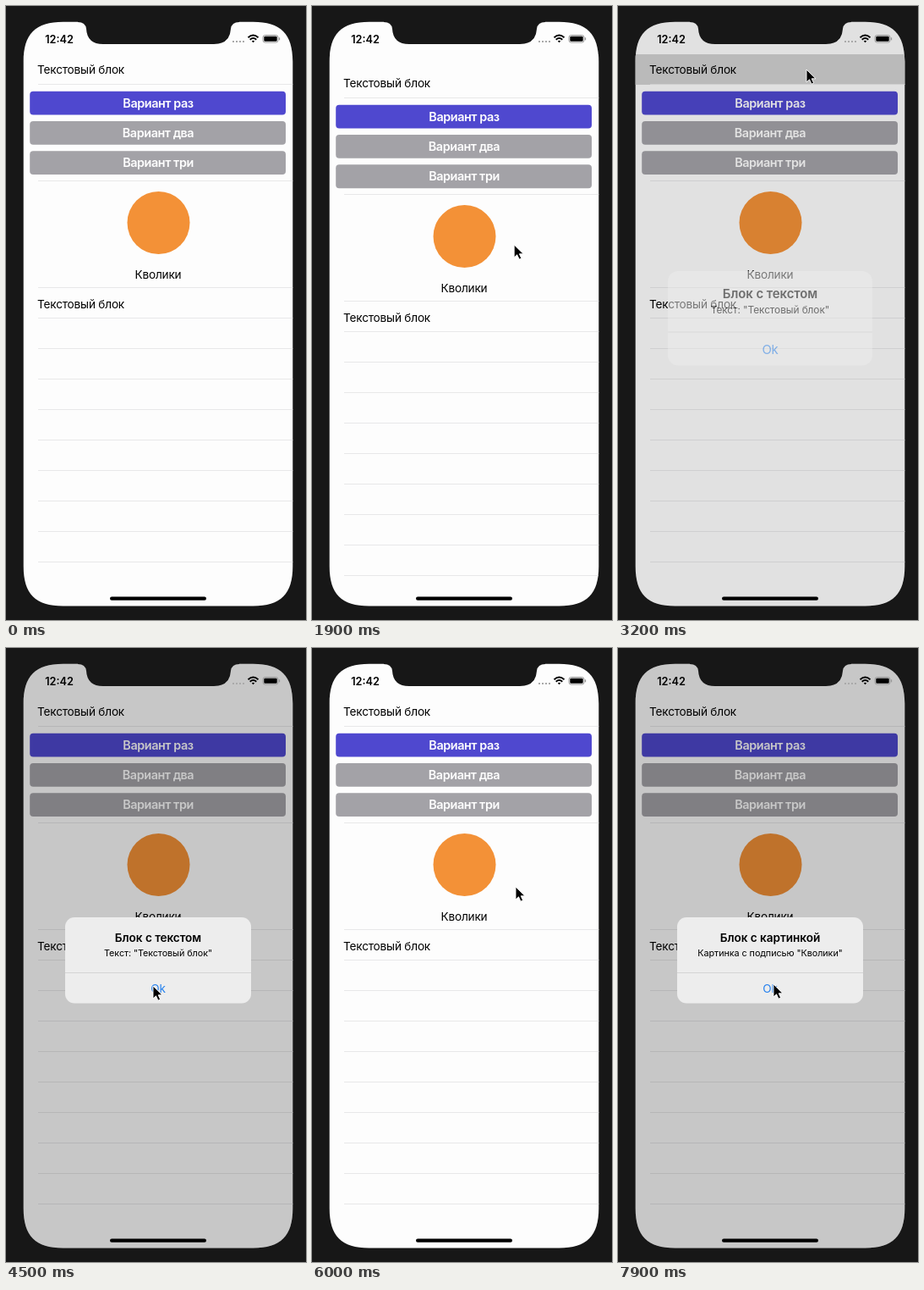
Recreate the animation shown at these times as an HTML page. Size 355 by 725 pixels, loop 8 s.

```html
<!DOCTYPE html>
<html lang="ru">
<head>
<meta charset="utf-8">
<style>
html, body { margin: 0; width: 100%; height: 100%; overflow: hidden; background: #171717; }
svg { display: block; width: 355px; height: 725px; }
text { font: 400 13.6px Inter, Roboto, sans-serif; letter-spacing: -.014em; }
.mid { text-anchor: middle; }
.button { font-size: 14.4px; font-weight: 600; letter-spacing: -.03em; fill: #fff; }
.title { font-weight: 600; letter-spacing: -.004em; }
.message { font-size: 10.8px; letter-spacing: -.006em; }
.clock { font-size: 12.7px; font-weight: 600; letter-spacing: 0; }
</style>
</head>
<body>
<svg viewBox="0 0 355 725">
  <defs><clipPath id="screen"><path id="outline"/></clipPath></defs>
  <g clip-path="url(#screen)">
    <rect width="355" height="725" fill="#fdfdfd"/>
    <g id="list">
      <rect id="textCell" x="20" y="57" width="320" height="36" fill="#d1d1d1"/>
      <rect id="imageCell" x="20" y="207" width="320" height="126" fill="#d1d1d1"/>
      <g id="lines" stroke="#e8e8e9"></g>
      <text x="37" y="80">Текстовый блок</text>
      <g id="buttons"></g>
      <circle cx="180.5" cy="256" r="37" fill="#f39137"/>
      <text class="mid" x="180" y="322">Кволики</text>
      <text x="37" y="356.5">Текстовый блок</text>
    </g>
    <rect id="dim" width="355" height="725"/>
  </g>
  <path d="M85 18H276V19Q267 19 266 27Q265 45 246 45H115Q96 45 95 27Q94 19 85 19Z" fill="#171717"/>
  <text class="clock mid" x="63" y="43.5">12:42</text>
  <path d="M268 42H282" stroke="#aaa" stroke-width="2" stroke-dasharray="2 2"/>
  <g fill="none" stroke="#000" stroke-width="1.9">
    <path d="M286.5 37.2Q292.5 31.8 298.5 37.2M288.7 39.8Q292.5 36.4 296.3 39.8"/>
    <path d="M292.5 43.2L290.8 41.4Q292.5 40.1 294.2 41.4Z" fill="#000" stroke="none"/>
  </g>
  <rect x="304" y="34.5" width="18" height="8.5" rx="2.5" fill="none" stroke="#999"/>
  <rect x="305.3" y="35.8" width="15.4" height="5.9" rx="1.3"/>
  <path d="M323.5 37.3v3" stroke="#999" stroke-width="1.3"/>
  <rect x="123" y="697.6" width="114" height="4.2" rx="2.1"/>
  <g id="alert">
    <rect x="70" y="318" width="220" height="101.5" rx="11" fill="#ededed"/>
    <path d="M70 383.5H290" stroke="#d4d4d4"/>
    <text id="title" class="title mid" x="180" y="347.3"></text>
    <text id="message" class="message mid" x="180" y="363.7"></text>
    <text class="mid" x="180" y="407" fill="#2580ee">Ok</text>
  </g>
  <path id="cursor" d="M0 0V15L3.5 11.8L6 17.2L8.6 16L6.2 10.8H11Z" stroke="#fff" stroke-width=".9"/>
</svg>
<script>
const $ = id => document.getElementById(id);
const clamp = v => Math.max(0, Math.min(1, v));
const ease = v => (v = clamp(v), v * v * (3 - 2 * v));
const ramp = (t, start, length) => ease((t - start) / length);
const pulse = (t, on, off, fade) => ramp(t, on, 80) - ramp(t, off, fade);

// Eased interpolation through rows of [time, ...values]
function track(rows, t) {
  const i = rows.findIndex(row => row[0] > t);
  if (i < 0) return rows.at(-1).slice(1);
  if (i === 0) return rows[0].slice(1);
  const [a, b] = [rows[i - 1], rows[i]];
  const k = ramp(t, a[0], b[0] - a[0]);
  return a.slice(1).map((v, j) => v + (b[j + 1] - v) * k);
}

// Rectangle with continuous corners: size is the corner's extent, pinch its sharpness
function smoothRect(left, top, right, bottom, size, pinch) {
  const c = size * (1 - pinch), k = size * pinch;
  return `M${left} ${top + size}c0 ${-c} ${k} ${-size} ${size} ${-size}`
    + `H${right - size}c${c} 0 ${size} ${k} ${size} ${size}`
    + `V${bottom - size}c0 ${c} ${-k} ${size} ${-size} ${size}`
    + `H${left + size}c${-c} 0 ${-size} ${-k} ${-size} ${-size}Z`;
}

const cursorPath = [
  [200, 356, 330], [750, 241, 260], [1300, 241, 289], [1500, 241, 294],
  [1800, 241, 290], [2400, 217, 183], [2900, 223, 75], [3500, 223, 75],
  [4300, 174, 399], [4950, 174, 399], [5800, 241, 282], [6800, 241, 282],
  [7600, 184, 397]
];
const pull = [[750, 0], [1300, 16], [1500, 19], [1800, 17], [2500, 0]];

$('outline').setAttribute('d', smoothRect(20.7, 18.7, 339.3, 708.5, 47, .3));
const lineY = [93, 207, ...Array.from({ length: 10 }, (_, i) => 333 + i * 36)];
$('lines').innerHTML = lineY.map(y => `<path d="M38 ${y - .5}H340"/>`).join('');
$('buttons').innerHTML = ['раз', 'два', 'три'].map((word, i) => {
  const y = 100.7 + i * 35.3;
  return `<rect x="28.2" y="${y}" width="302.8" height="27.8" rx="4" fill="${i ? '#a3a2a7' : '#4f48cf'}"/>
    <text class="button mid" x="180" y="${y + 19}">Вариант ${word}</text>`;
}).join('');

function draw(t) {
  const second = t > 6000;
  const open = ramp(t, second ? 6600 : 3060, 280);
  const shown = second ? open : open - ramp(t, 4750, 280);
  const [x, y] = track(cursorPath, t);

  $('list').setAttribute('transform', `translate(0 ${track(pull, t)[0]})`);
  $('textCell').setAttribute('opacity', pulse(t, 2970, 3250, 350));
  $('imageCell').setAttribute('opacity', pulse(t, 6500, 6790, 350));
  $('dim').setAttribute('opacity', .215 * shown);
  $('title').textContent = second ? 'Блок с картинкой' : 'Блок с текстом';
  $('message').textContent = second ? 'Картинка с подписью "Кволики"' : 'Текст: "Текстовый блок"';
  $('alert').setAttribute('opacity', shown);
  $('alert').setAttribute('transform', `translate(180 369) scale(${1.2 - .2 * open}) translate(-180 -369)`);
  $('cursor').setAttribute('transform', `translate(${x} ${y})`);
}

function frame() {
  draw(performance.now() % 8000);
  requestAnimationFrame(frame);
}
frame();
</script>
</body>
</html>
```
